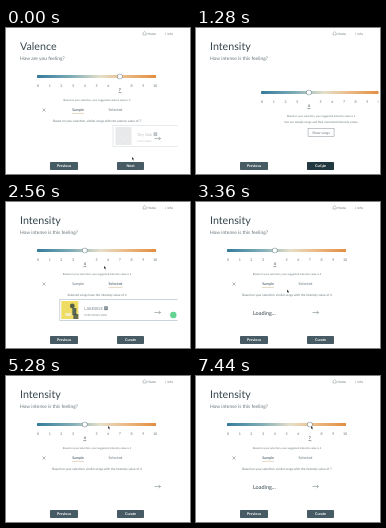
Write an HTML page with a canvas that moves like this. It is 184 by 146 pixels and loops after 8000 ms.

```html
<!DOCTYPE html>
<html lang="en">
<head>
<meta charset="utf-8">
<title>Song survey</title>
<style>
html, body { margin: 0; width: 100%; height: 100%; overflow: hidden; background: #fff; }
canvas { display: block; width: 184px; height: 146px; }
</style>
</head>
<body>
<canvas id="stage" width="184" height="146"></canvas>
<script>
const canvas = document.getElementById('stage');
const ctx = canvas.getContext('2d');
const LOOP = 8000;
const INK = '#37474f', GREY = '#66747a', SLATE = '#465b64', GREEN = '#3fc878';

const clamp = v => Math.max(0, Math.min(1, v));
const progress = (t, start, length) => clamp((t - start) / length);
const easeOut = p => 1 - (1 - p) ** 3;
const easeInOut = p => p * p * (3 - 2 * p);

const pointer = [
  [0, 126, 129], [320, 125, 136], [1340, 125, 136], [1720, 91, 105],
  [2040, 91, 105], [2320, 108, 81], [2400, 108, 81], [2560, 98, 64],
  [2720, 93, 66], [3000, 73, 81], [3200, 73, 81], [3720, 152, 110],
  [4640, 152, 110], [5200, 102, 50], [5600, 102, 50], [6240, 115, 50], [8000, 115, 50]
];

function pointerAt(t) {
  let i = 1;
  while (i < pointer.length - 1 && t > pointer[i][0]) i++;
  const [t0, x0, y0] = pointer[i - 1], [t1, x1, y1] = pointer[i];
  const p = easeInOut(progress(t, t0, t1 - t0));
  return [x0 + (x1 - x0) * p, y0 + (y1 - y0) * p];
}

function text(str, x, y, size, { color = GREY, align = 'left', weight = 400 } = {}) {
  ctx.font = `${weight} ${size}px Lato, sans-serif`;
  ctx.textAlign = align;
  ctx.fillStyle = color;
  ctx.fillText(str, x, y);
}

function rect(x, y, w, h, color) {
  ctx.fillStyle = color;
  ctx.fillRect(x, y, w, h);
}

function roundRect(x, y, w, h, r, color) {
  ctx.fillStyle = color;
  ctx.beginPath();
  ctx.roundRect(x, y, w, h, r);
  ctx.fill();
}

function disc(x, y, r, color) {
  ctx.fillStyle = color;
  ctx.beginPath();
  ctx.arc(x, y, r, 0, Math.PI * 2);
  ctx.fill();
}

function line(points, color, width = 0.6) {
  ctx.strokeStyle = color;
  ctx.lineWidth = width;
  ctx.beginPath();
  points.forEach(([x, y], i) => i ? ctx.lineTo(x, y) : ctx.moveTo(x, y));
  ctx.stroke();
}

function layer(dx, dy, alpha, draw) {
  if (alpha <= 0) return;
  ctx.save();
  ctx.translate(dx, dy);
  ctx.globalAlpha *= alpha;
  draw();
  ctx.restore();
}

function button(label, x, w, hover) {
  roundRect(x, 134, w, 8, 0.8, hover ? '#213840' : SLATE);
  text(label, x + w / 2, 139.4, 3.7, { color: '#fff', align: 'center', weight: 700 });
}

function header(t) {
  const valence = t < 680;
  line([[137, 5], [138.6, 3.5], [140.2, 5], [140.2, 7], [137, 7], [137, 5]], GREY, 0.4);
  text('Home', 141.5, 6.5, 3.2);
  text('i', 159, 6.5, 3.2);
  text('Info', 161.5, 6.5, 3.2);
  text(valence ? 'Valence' : 'Intensity', 14, 22, 10.7, { color: INK });
  text(valence ? 'How are you feeling?' : 'How intense is this feeling?', 14, 32, 4.85);
}

function slider(value, kind, suggested) {
  const place = n => 32 + n * 11.7;
  const fill = ctx.createLinearGradient(31, 0, 150, 0);
  [[0, '#347b9d'], [0.3, '#82afb7'], [0.53, '#e5dfc9'], [0.75, '#ebb984'], [1, '#e28d40']]
    .forEach(([at, color]) => fill.addColorStop(at, color));
  roundRect(31, 47, 119, 3, 0.6, fill);
  for (let n = 0; n <= 10; n++) {
    const chosen = n === value;
    text(n, place(n), chosen ? 63.4 : 59, 3.6, {
      align: 'center', color: chosen ? INK : GREY, weight: chosen ? 700 : 400
    });
  }
  line([[place(value) - 1.5, 64.6], [place(value) + 1.5, 64.6]], INK, 0.5);
  disc(place(value), 48.5, 2.8, '#7d9096');
  disc(place(value), 48.5, 2.2, '#fff');
  text(`Based on your selection, your suggested ${kind} value is ${suggested}`,
    91, 73, 2.65, { align: 'center' });
}

function tabs(selected, message) {
  line([[36.5, 80.5], [39.5, 83.5]], GREY, 0.5);
  line([[39.5, 80.5], [36.5, 83.5]], GREY, 0.5);
  text('Sample', 72, 83.3, 3.7, { align: 'center', color: selected ? GREY : INK });
  text('Selected', 109.5, 83.3, 3.7, { align: 'center', color: selected ? INK : GREY });
  const x = selected ? 102.5 : 66;
  line([[x, 85.4], [x + (selected ? 14 : 12), 85.4]], '#c9b08d', 0.5);
  text(message, 91, 93.7, 3.1, { align: 'center' });
}

function arrow(hover) {
  if (hover) rect(147, 105, 9, 11, '#e8eaeb');
  line([[148.5, 110.5], [154.5, 110.5]], GREY, 0.5);
  line([[152.7, 108.8], [154.5, 110.5], [152.7, 112.2]], GREY, 0.5);
}

const covers = {
  pale() {
    rect(0, 0, 16, 18, '#c5c9ca');
    disc(5, 6, 2, '#eceeee');
    line([[1, 15], [6, 10], [9, 13], [12, 9], [16, 14]], '#eef0f0', 1.2);
  },
  yellow() {
    rect(-1, 0, 17, 18, '#ecd43d');
    disc(10, 5, 2.4, '#30433e');
    rect(10, 7, 4, 7, '#344b53');
    rect(3, 12, 6, 3, '#f6f0d5');
    rect(11, 13, 5, 5, '#40504a');
  },
  mosaic() {
    rect(0, 0.5, 14, 14, '#20282a');
    const colors = ['#b54944', '#658e68', '#d0b477', '#517998', '#dad5c8'];
    for (let i = 0; i < 25; i++)
      rect(0.4 + i % 5 * 2.7, 1 + Math.floor(i / 5) * 2.7, 1.9, 1.8, colors[(i * 7 + Math.floor(i / 4)) % 5]);
  },
  dusk() {
    rect(0, 1.5, 18, 15, '#a98a6a');
    rect(0, 1.5, 18, 5, '#d7c9aa');
    disc(6, 7, 3, '#292c30');
    rect(2, 10, 9, 6.5, '#20282d');
    disc(13, 8, 2.2, '#40352e');
    rect(10, 11, 7, 5.5, '#e2ddd2');
  }
};

function card(x, alpha, { title, artist, cover, explicit }) {
  layer(x, 97, alpha, () => {
    rect(0, 0, 120, 22, '#fff');
    ctx.strokeStyle = '#a3b6be';
    ctx.lineWidth = 0.7;
    ctx.strokeRect(0.5, 0.5, 119, 21);
    layer(3, 2, 1, covers[cover]);
    text(title, 25, 10.8, 4, { color: '#52626a' });
    const end = 26.5 + ctx.measureText(title).width;
    if (explicit) {
      rect(end, 7.3, 3.6, 3.8, '#52626a');
      text('E', end + 1.8, 10.2, 2.6, { color: '#fff', align: 'center', weight: 700 });
    }
    text(artist, 25, 16.8, 2.7);
    disc(114, 16, 3.2, GREEN);
  });
}

const songs = {
  first: { title: 'Dry Oak', artist: 'Inlet Harbor', cover: 'pale', explicit: true },
  lake: { title: 'LAKESIDE', artist: 'NORTHORCHARD', cover: 'yellow', explicit: true },
  quiet: { title: 'Quiet Lanterns', artist: 'Tam Werrowby', cover: 'mosaic' },
  ember: { title: 'Glow (feat. Lio Marn)', artist: 'Nell Drovanto', cover: 'dusk', explicit: true }
};

function clipCards(draw) {
  ctx.save();
  ctx.beginPath();
  ctx.rect(0, 95, 171.5, 26);
  ctx.clip();
  draw();
  ctx.restore();
}

function valencePage(t) {
  const leave = easeInOut(progress(t, 680, 440));
  layer(-70 * leave, 0, 1 - leave, () => {
    slider(7, 'valence', 5);
    tabs(false, 'Based on your selection, similar songs with the valence value of 7');
    const enter = easeOut(progress(t, 0, 480));
    clipCards(() => card(107 - 80 * enter, 0.4 + 0.6 * enter, songs.first));
    arrow(false);
  });
}

function introPage(t) {
  const enter = easeOut(progress(t, 1100, 600));
  layer(100 * (1 - enter), 16, clamp(enter * 1.6), () => {
    slider(4, 'intensity', 4);
    text('See our sample songs and their associated intensity values', 91, 78.7, 2.9, { align: 'center' });
    const hover = t >= 1840;
    rect(78, 84.5, 26, 8, hover ? '#e6eaeb' : '#fff');
    ctx.strokeStyle = '#839096';
    ctx.lineWidth = 0.5;
    ctx.strokeRect(78, 84.5, 26, 8);
    text('Show songs', 91, 89.7, 3.4, { align: 'center' });
  });
}

function loading() {
  text('Loading...', 57, 112.5, 5.5, { color: INK });
  layer(-32, 0, 1, () => arrow(false));
}

function songPage(t) {
  const selected = t >= 2360 && t < 3160;
  const value = t >= 6640 ? 7 : 4;
  slider(value, 'intensity', 4);
  tabs(selected, selected
    ? `Selected songs have the intensity value of ${value}`
    : `Based on your selection, similar songs with the intensity value of ${value}`);

  if (t < 2360 || (t >= 3160 && t < 3440) || t >= 6720) {
    loading();
    return;
  }
  clipCards(() => {
    if (selected) {
      const enter = easeOut(progress(t, 2400, 520));
      card(27 + 80 * (1 - enter), 0.4 + 0.6 * enter, songs.lake);
    } else if (t < 5120) {
      const leave = easeInOut(progress(t, 4480, 560));
      card(25 - 20 * leave, progress(t, 3440, 160) * (1 - leave), songs.quiet);
    } else if (t >= 5520) {
      const enter = easeOut(progress(t, 5520, 640));
      card(27 + 100 * (1 - enter), 0.2 + 0.8 * enter, songs.ember);
    }
  });
  arrow(t >= 3720 && t < 4720);
}

function drawPointer(t) {
  const [x, y] = pointerAt(t);
  layer(x, y, 1, () => {
    ctx.scale(0.7, 0.7);
    ctx.beginPath();
    [[0, 0], [0, 4.2], [1, 3.3], [1.8, 5], [2.5, 4.6], [1.8, 3], [3, 3]]
      .forEach(([px, py]) => ctx.lineTo(px, py));
    ctx.closePath();
    ctx.strokeStyle = '#fff';
    ctx.lineWidth = 0.6;
    ctx.stroke();
    ctx.fillStyle = '#333';
    ctx.fill();
  });
}

function resize() {
  const ratio = window.devicePixelRatio || 1;
  canvas.width = 184 * ratio;
  canvas.height = 146 * ratio;
  ctx.setTransform(ratio, 0, 0, ratio, 0, 0);
  ctx.textRendering = 'geometricPrecision';
}

function render(t) {
  rect(0, 0, 184, 146, '#fff');
  ctx.save();
  ctx.beginPath();
  ctx.rect(0, 0, 182.5, 146);
  ctx.clip();
  header(t);
  if (t < 1120) valencePage(t);
  if (t >= 1100 && t < 2000) introPage(t);
  if (t >= 2000) songPage(t);
  button('Previous', 44, 28, false);
  button(t < 680 ? 'Next' : 'Curate', 111, 27, t >= 240 && t < 1440);
  drawPointer(t);
  ctx.restore();
}

resize();
window.addEventListener('resize', resize);
const start = performance.now();
function tick() {
  render((performance.now() - start) % LOOP);
  requestAnimationFrame(tick);
}
tick();
</script>
</body>
</html>
```
